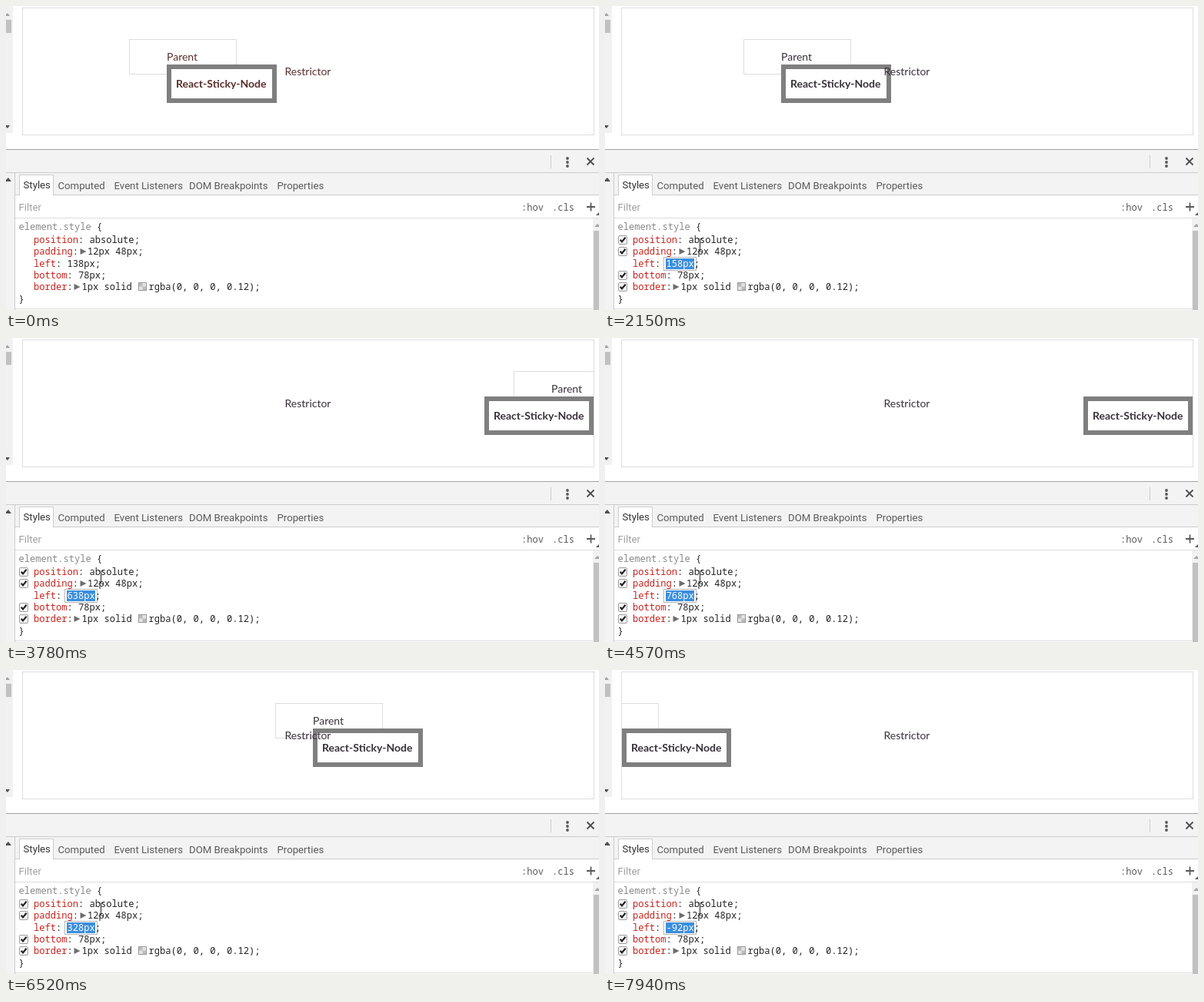
Write an HTML page that moves like this. It is 771x395 px and loops after 8 s.

```html
<!DOCTYPE html>
<html lang="en">
<head>
<meta charset="utf-8">
<title>Sticky node demo</title>
<style>
  html, body { margin: 0; width: 100%; height: 100%; overflow: hidden; background: #fff; }
  svg { display: block; width: 771px; height: 395px; }
  text { white-space: pre; }
  .page { font: 14px Lato, sans-serif; }
  .ui { font: 13.2px Roboto, sans-serif; fill: #5a5a5a; }
  .code { font: 12.1px "Noto Sans Mono", monospace; fill: #222; }
  .prop { fill: #c5221c; }
  .line { fill: none; stroke: #ddd; }
</style>
</head>
<body>
<svg viewBox="0 0 771 395">
  <defs>
    <clipPath id="inside"><rect x="22" y="3" width="742" height="164"/></clipPath>
    <g id="check">
      <rect x=".5" y=".5" width="11" height="11" rx="1.5" fill="#f4f4f4" stroke="#a0a0a0"/>
      <path d="M2.8 5.8 5 8.4 9.6 2.8" fill="none" stroke="#222" stroke-width="2.2"/>
    </g>
    <path id="fold" d="M0 0 8 4 0 8Z" fill="#6e6e6e"/>
  </defs>

  <!-- page -->
  <rect y="0" width="9" height="165" fill="#f1f1f1"/>
  <rect y="18" width="7" height="17" fill="#c1c1c1"/>
  <path d="M-2 13 2 9 5 13Z" fill="#a3a3a3"/>
  <path d="M-2 155H5L2 159Z" fill="#505050"/>
  <rect class="line" x="21.5" y="2.5" width="743" height="165"/>
  <g id="page" class="page">
    <g clip-path="url(#inside)">
      <g id="parent">
        <rect class="line" x=".5" y="43.5" width="139" height="45"/>
        <text x="49" y="71">Parent</text>
      </g>
      <g id="sticky">
        <rect id="frame" x="3" y="79" width="137" height="44" fill="#fff" stroke="#7f7f7f" stroke-width="6"/>
        <text x="12" y="106" font-weight="700">React-Sticky-Node</text>
      </g>
    </g>
    <text x="362.5" y="90">Restrictor</text>
  </g>

  <!-- inspector -->
  <rect y="186" width="771" height="60" fill="#f3f3f3"/>
  <path d="M0 186.5H771" stroke="#a3a3a3"/>
  <path d="M0 216.5H771M708.5 194V211M11.5 217V395M12 245.5H771" stroke="#ccc"/>
  <rect y="217" width="11" height="178" fill="#f3f3f3"/>
  <path d="M-2 228 3 223 7 228Z" fill="#505050"/>
  <g fill="#5a5a5a">
    <circle cx="730" cy="198" r="1.9"/><circle cx="730" cy="203" r="1.9"/><circle cx="730" cy="208" r="1.9"/>
  </g>
  <path d="M755.5 197.5 764.5 206.5M764.5 197.5 755.5 206.5" stroke="#4a4a4a" stroke-width="1.8"/>
  <path d="M17.5 246V219.5H61.5V246" fill="#fff" stroke="#ccc"/>
  <g class="ui">
    <text x="22.5" y="237" fill="#333">Styles</text>
    <text x="67.5" y="238">Computed</text>
    <text x="140.5" y="238">Event Listeners</text>
    <text x="238" y="238">DOM Breakpoints</text>
    <text x="352.5" y="238">Properties</text>
    <text x="16.5" y="266" style="fill:#a0a0a0">Filter</text>
  </g>
  <g class="code" font-weight="600" style="fill:#5a5a5a">
    <text x="670" y="266">:hov</text><text x="710" y="266">.cls</text>
  </g>
  <path d="M755 261H766M760.5 255.5V266.5" stroke="#5a5a5a" stroke-width="1.8"/>
  <path d="M771 268V272H767Z" fill="#5a5a5a"/>
  <path d="M12 275.5H771M12 393.5H763" stroke="#ddd"/>
  <rect x="763" y="276" width="8" height="119" fill="#f1f1f1"/>
  <rect x="764" y="292" width="7" height="103" fill="#c1c1c1"/>
  <path d="M765 287 769 283 773 287Z" fill="#a3a3a3"/>

  <!-- rule -->
  <g class="code">
    <text x="16.5" y="291"><tspan fill="#888">element.style</tspan> {</text>
    <text x="36" y="308"><tspan class="prop">position</tspan>: absolute;</text>
    <text x="36" y="323"><tspan class="prop">padding</tspan>:</text>
    <text x="106" y="323">12px 48px;</text>
    <text x="36" y="339"><tspan class="prop">left</tspan>:</text>
    <text x="36" y="354"><tspan class="prop">bottom</tspan>: 78px;</text>
    <text x="36" y="369"><tspan class="prop">border</tspan>:</text>
    <text x="98.5" y="369">1px solid</text>
    <text x="185.5" y="369">rgba(0, 0, 0, 0.12);</text>
    <text x="16.5" y="385">}</text>
    <use href="#fold" x="96.5" y="315"/>
    <use href="#fold" x="88.5" y="361"/>
    <rect x="172.5" y="359.5" width="10" height="10" fill="#e4e4e4" stroke="#999"/>
    <path d="M173 360H177.5V364.5H173ZM177.5 364.5H182V369H177.5Z" fill="#bbb"/>
    <g id="edit">
      <rect id="box" x="76.5" y="326.5" height="17" fill="#fff" stroke="#b5b5b5"/>
      <rect id="mark" x="79" y="328" height="14" fill="#3b8ede"/>
    </g>
    <text id="value" x="79.5" y="339"></text>
    <text id="semi" y="339">;</text>
  </g>
  <g id="checks">
    <use href="#check" x="17" y="298"/><use href="#check" x="17" y="313"/>
    <use id="leftCheck" href="#check" x="17" y="329"/>
    <use href="#check" x="17" y="344"/><use href="#check" x="17" y="359"/>
  </g>
  <path id="cursor" d="M-3 -8.5H-1L0 -7.5 1 -8.5H3M0 -7.5V7.5M-3 8.5H-1L0 7.5 1 8.5H3" fill="none" stroke="#222"/>
</svg>

<script>
const LOOP = 8000, CHAR = 7.26, REPEAT = 34.2;
const $ = id => document.getElementById(id);
const set = (id, attrs) => { for (const k in attrs) $(id).setAttribute(k, attrs[k]); };
const show = (id, on) => set(id, { visibility: on ? 'visible' : 'hidden' });
const move = (id, x, y = 0) => set(id, { transform: `translate(${x} ${y})` });
const clamp = (v, lo, hi) => Math.min(hi, Math.max(lo, v));

// screen refreshes: [first, last, count]
const ticks = [[0, 0, 1], [70, 870, 11], [1030, 1270, 4], [1590, 1670, 2],
  [2150, 2770, 9], [2850, 2940, 2], [3020, 3780, 11], [3860, 4260, 6], [4570, 4570, 1],
  [5030, 5810, 11], [5890, 6670, 11], [6750, 7550, 11], [7640, 7940, 5]]
  .flatMap(([a, b, n]) => Array.from({ length: n }, (_, i) => a + (b - a) * i / Math.max(1, n - 1)));
const snap = t => ticks.filter(k => k <= t).pop();

// key presses: one step, a pause, then auto-repeat
const repeats = ms => 10 * Math.floor(ms / REPEAT + 0.36);
function leftAt(t) {
  if (t < 1670) return 138;
  if (t < 2150) return 148;
  if (t < 4570) return 158 + repeats(t - 2150);
  if (t < 5030) return 768;
  return 758 - repeats(t - 5030);
}

function pointer(t) {
  const ease = u => 1 - (1 - u) ** 2;
  const a = ease(clamp((t - 70) / 800, 0, 1)), b = ease(clamp((t - 950) / 320, 0, 1));
  return [778 - 670 * a + 14.5 * b, 310 + 26 * a - 25 * b];
}

function draw(time) {
  const t = snap(time), left = leftAt(t), editing = t >= 1030;
  const x = left + 22, free = x + 49, sx = clamp(free, 22, 622);
  move('parent', x);
  move('sticky', sx);
  set('frame', { width: sx === free ? 137 : 136 });
  set('page', { fill: t < 70 ? '#5a2e2c' : '#38303a' });

  const label = left + 'px', w = label.length * CHAR;
  $('value').textContent = label;
  set('value', { fill: editing ? '#fff' : '#222', style: editing ? 'fill:#fff' : '' });
  set('semi', { x: 79.5 + w });
  set('box', { width: w + 5.7 });
  set('mark', { width: w + 0.7 });
  show('edit', editing);

  const [px, py] = pointer(t);
  move('cursor', Math.round(px) + 0.5, Math.round(py));
  show('cursor', t >= 70);
  show('checks', t > 70);
  show('leftCheck', t > 70 && !editing);
}

const start = performance.now();
(function tick() {
  draw((performance.now() - start) % LOOP);
  requestAnimationFrame(tick);
})();
</script>
</body>
</html>
```
